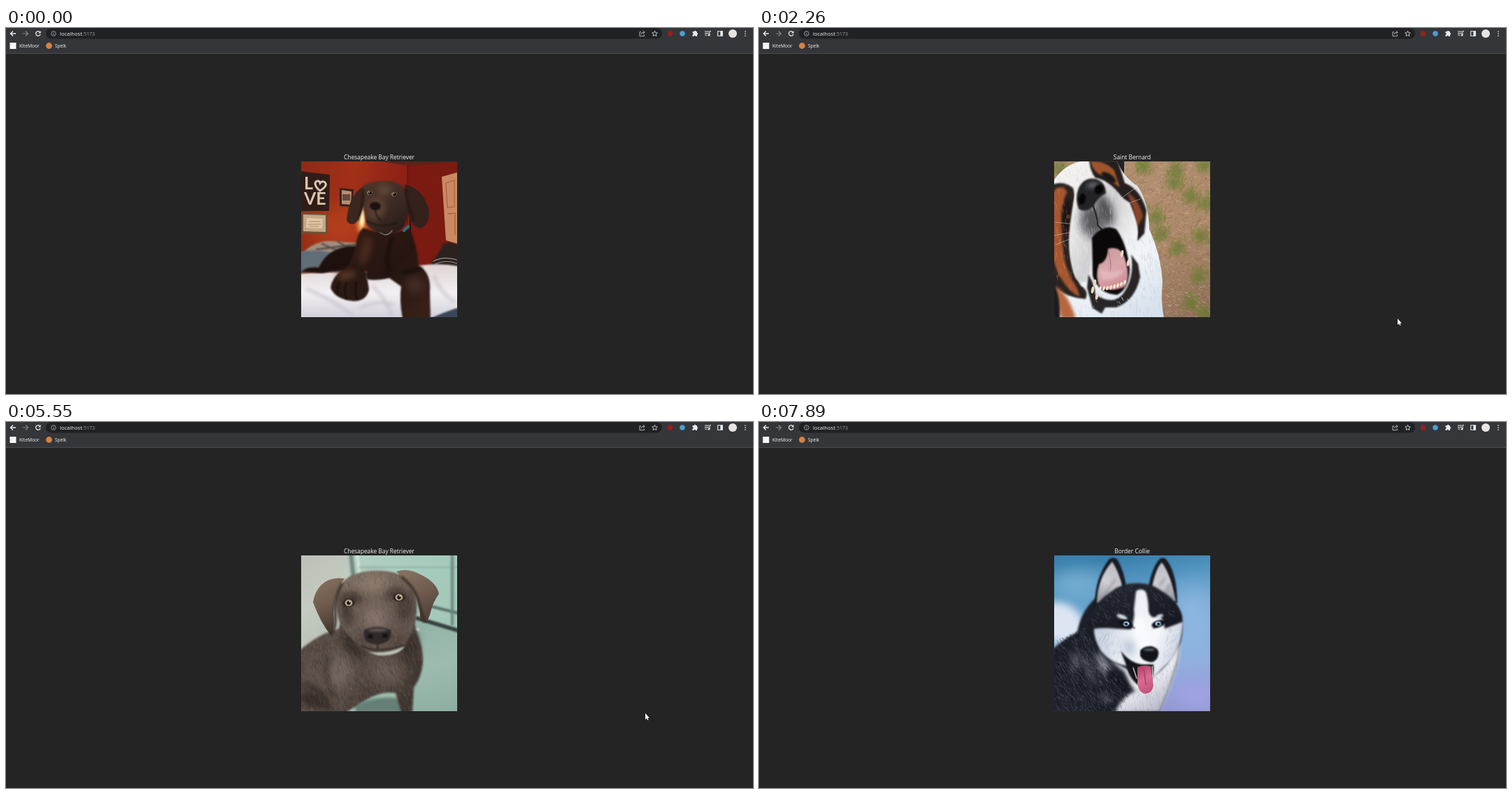
An HTML page with a canvas that plays this animation: 1068x524 px, repeating every 8.22 s.

```html
<!DOCTYPE html>
<html lang="en">
<head>
<meta charset="utf-8">
<title>Dog viewer</title>
<style>
html, body { margin: 0; width: 100%; height: 100%; overflow: hidden; background: #242424; }
canvas { display: block; width: 1068px; height: 524px; }
</style>
</head>
<body>
<canvas id="stage" width="1068" height="524"></canvas>
<script>
const W = 1068, H = 524, LOOP = 8220;
const BOX = { x: 422, y: 191, s: 223 };
const FONT = '"Open Sans", "Noto Sans", sans-serif';
const stage = document.getElementById('stage').getContext('2d');

function random(seed) {
  return () => {
    seed = (seed * 1664525 + 1013904223) % 4294967296;
    return seed / 4294967296;
  };
}

// Renders a picture once; all coordinates are stage coordinates.
function photo(paint) {
  const c = document.createElement('canvas');
  c.width = c.height = BOX.s;
  const g = c.getContext('2d');
  g.translate(-BOX.x, -BOX.y);
  const shape = (color, d, blur = 0.7) => {
    g.filter = blur ? `blur(${blur}px)` : 'none';
    g.fillStyle = color;
    g.fill(new Path2D(d));
    g.filter = 'none';
  };
  const oval = (color, x, y, rx, ry, turn = 0, blur = 0.5) => {
    g.filter = blur ? `blur(${blur}px)` : 'none';
    g.fillStyle = color;
    g.beginPath();
    g.ellipse(x, y, rx, ry, turn, 0, 7);
    g.fill();
    g.filter = 'none';
  };
  const line = (color, d, width, blur = 0.4) => {
    g.filter = blur ? `blur(${blur}px)` : 'none';
    g.strokeStyle = color;
    g.lineWidth = width;
    g.lineCap = 'round';
    g.stroke(new Path2D(d));
    g.filter = 'none';
  };
  const fade = (x0, y0, x1, y1, ...colors) => {
    const f = g.createLinearGradient(x0, y0, x1, y1);
    colors.forEach((k, i) => f.addColorStop(i / (colors.length - 1), k));
    return f;
  };
  // Short strokes inside a shape, for hair and ground texture.
  const fur = (color, d, n, dx, dy, seed) => {
    const r = random(seed);
    g.save();
    g.clip(new Path2D(d));
    g.strokeStyle = color;
    g.lineWidth = 0.7;
    g.beginPath();
    for (let i = 0; i < n; i++) {
      const x = BOX.x + r() * BOX.s, y = BOX.y + r() * BOX.s;
      g.moveTo(x, y);
      g.lineTo(x + dx * (0.4 + r()), y + dy * (0.4 + r()));
    }
    g.stroke();
    g.restore();
  };
  paint({ g, shape, oval, line, fade, fur });
  return c;
}

const ALL = 'M422 191H645V414H422Z';

const bedroom = photo(({ g, shape, oval, line, fade }) => {
  shape(fade(422, 200, 645, 240, '#8e2a16', '#a23018', '#8c2014', '#741810'), ALL, 0);
  oval('rgba(196,76,34,.5)', 480, 285, 52, 30, 0, 14);
  shape('#5a2319', 'M515 188H648V193L574 197Z');
  shape('#7a1a11', 'M574 197L645 192V345H578Z');
  line('#4f120d', 'M574 197V300', 1);
  shape('#c98a63', 'M623 213L648 206V310L629 304Z');
  line('#a8643f', 'M629 222L641 218V256L631 257ZM632 266L642 265V296', 1.3);
  shape('#301d19', 'M420 205L463 210L462 262L420 262Z');
  g.fillStyle = '#ddc6ac';
  g.font = 'bold 25px Lato, sans-serif';
  g.fillText('L', 426, 231);
  g.fillText('VE', 426, 253);
  line('#ddc6ac', 'M449 233C441 227 440 219 446 219Q448 219 449 222Q452 218 456 221C460 225 454 230 449 233Z', 3);
  shape('#37211c', 'M477 229L497 231L495 256L477 255Z');
  shape('#b78e70', 'M480 232L494 234L493 253L480 252Z');
  shape('#66483e', 'M481 238H492V247H481Z');
  shape('#6c5037', 'M423 264L460 266L459 295L423 294Z');
  shape('#c3a787', 'M425 267L457 268L457 292L425 291Z');
  shape('#dfc7a4', 'M430 272L453 273L452 287L429 286Z');
  line('#9b7a5b', 'M434 277H449M432 281H450M435 284H447', 0.8);
  oval('#ffc668', 508, 274, 5, 19, 0, 3);
  oval('#fff0c2', 509, 272, 3, 12, 0, 1.5);
  line('#2d1512', 'M578 262V330', 2);
  shape('#a58d7b', 'M424 322Q445 301 474 306L510 308V332H424Z', 1);
  line('#4c4a4b', 'M444 317L500 310M452 309L485 324M475 306L500 321', 2.4, 1);
  shape('#616d77', 'M420 320Q455 315 476 326L482 350H420Z', 1);
  shape('#2b2220', 'M609 334Q620 322 625 309L632 307L648 310V344H609Z', 1);
  line('#998e86', 'M611 334Q626 326 645 332M614 338Q628 331 645 337', 1.2, 0.6);
  shape(fade(422, 345, 422, 414, '#e1d8d8', '#f3f0f3', '#d3d1db'), 'M420 352Q460 348 500 352L590 340Q620 336 648 341V416H420Z', 1);
  line('#c2bfca', 'M430 374Q470 390 495 411M525 370Q545 390 552 413M612 355Q622 380 641 392M507 400Q530 389 554 396', 3, 2.5);
  shape('#3a4658', 'M606 416Q628 406 648 400V416Z', 1);
  shape('#1e100c', 'M422 349Q431 341 447 343Q462 311 501 312L514 353Q480 344 452 351Z', 1);
  const body = 'M511 286Q543 300 577 287Q588 312 590 340Q608 350 606 378L607 416H567Q562 390 565 370L548 358Q530 362 517 360Q512 354 516 348Q500 343 482 348Q494 338 501 306Q504 291 511 286Z';
  shape(fade(495, 300, 600, 400, '#311b14', '#251510', '#372018'), body, 0.8);
  oval('#4b2c20', 514, 318, 7, 21, 0.25, 5);
  oval('#422c25', 585, 368, 14, 12, 0.4, 6);
  line('#120b09', 'M567 350Q582 350 593 343M553 300Q541 325 548 348', 3, 2);
  shape('#2b1913', 'M480 347Q500 339 515 350L519 374Q516 391 497 391Q471 389 464 372Q466 357 480 347Z', 0.8);
  line('#110b09', 'M477 364Q471 374 475 381M487 364Q482 376 487 388M501 363Q498 376 502 388', 1.8, 0.8);
  oval('#583727', 487, 354, 13, 6, -0.2, 4);
  shape('#3b2720', 'M514 225Q490 237 487 275Q490 283 499 280Q511 265 514 235Z');
  shape('#34211c', 'M570 224Q595 229 604 258Q608 279 593 287Q580 285 574 263Z');
  shape(fade(515, 220, 570, 290, '#4c352b', '#3f2c24', '#281b17'), 'M509 228Q519 218 547 219Q567 220 574 239Q579 262 570 283Q558 297 541 296Q520 291 515 279Q510 253 509 228Z', 0.8);
  line('#22150f', 'M511 232Q511 256 503 276M571 230Q574 256 583 276', 2.5, 1.5);
  oval('#624839', 541, 232, 10, 8, 0, 5);
  oval('#5b4134', 529, 258, 13, 17, 0.2, 4);
  oval('#1b1210', 528, 255, 8, 6, 0.1, 0.8);
  line('#1e1412', 'M528 261Q529 272 536 275M516 277Q538 287 558 279', 1.8, 0.8);
  line('#747370', 'M535 293Q545 300 552 290', 1.5);
  line('#247383', 'M569 290L575 284', 4);
  for (const [x, y] of [[520, 236], [555, 238]]) {
    oval('#a08a71', x, y, 3.6, 3);
    oval('#17100e', x + 0.5, y, 2.6, 2.6, 0, 0.2);
    oval('#f2e9d9', x - 0.5, y - 1, 0.7, 0.7, 0, 0);
  }
});

const bernard = photo(({ shape, oval, line, fade, fur }) => {
  shape(fade(520, 191, 645, 414, '#b08f70', '#ad896b', '#8e7059'), ALL, 0);
  fur('rgba(218,190,157,.5)', ALL, 1400, 4, 2, 4);
  fur('rgba(96,69,48,.4)', ALL, 1100, -3, 3, 9);
  const r = random(22);
  const grass = [[596, 203], [637, 197], [617, 241], [638, 252], [594, 222], [632, 298], [600, 315], [629, 357], [617, 393], [568, 270], [575, 295], [638, 410], [550, 198], [429, 201]];
  for (const [x, y] of grass) {
    oval('rgba(91,117,42,.6)', x, y, 10, 10, 0, 4);
    for (let i = 0; i < 28; i++) {
      const px = x + (r() - 0.5) * 27, py = y + (r() - 0.5) * 27;
      line('rgba(104,137,42,.6)', `M${px} ${py}l${r() * 6 - 2} ${-3 - r() * 5}`, 1, 0);
    }
  }
  shape('#202229', 'M513 190H522V222H512Z');
  const coat = 'M420 220Q439 192 466 190L512 190Q522 215 541 226Q557 249 558 288Q575 326 577 363Q574 389 579 416H420Z';
  shape(fade(440, 200, 570, 400, '#f5f3f1', '#e7e6e7', '#f1f4f8', '#d6e2ed'), coat);
  fur('rgba(156,158,167,.22)', coat, 1200, 1, 6, 7);
  shape('#25201f', 'M472 190H513L523 222Q545 230 554 261L551 294L541 305Q543 278 530 250Q505 235 487 222Q474 210 472 190Z', 1);
  shape('#9e552c', 'M474 191Q496 190 508 204L516 228Q503 220 491 211Q479 208 474 191Z', 1.3);
  shape('#8a4526', 'M526 235Q544 246 549 270L540 286Q537 258 526 235Z', 1.5);
  oval('#191617', 500, 214, 12, 5, 0.6, 1.5);
  shape('#292221', 'M420 224Q436 218 449 229Q455 248 445 286Q438 331 460 369Q472 376 467 388Q440 386 420 370Z', 1);
  shape('#a65730', 'M420 235Q431 221 440 234Q432 253 434 282Q430 326 447 360Q457 373 458 385Q438 374 426 347L420 330Z', 1.5);
  oval('#1e1716', 440, 269, 7, 24, 0.1, 2);
  oval('#5b3528', 442, 270, 2.5, 3, 0, 0.5);
  fur('rgba(219,140,93,.45)', 'M420 220H440V310L455 382L438 386L420 345Z', 700, 1, 7, 12);
  shape('#b7653d', 'M422 369Q440 376 453 416H432Z', 2);
  shape('#211c1c', 'M420 362Q432 384 430 416H420Z', 1);
  const muzzle = 'M455 226Q449 247 445 280Q442 332 452 357Q461 370 472 359L477 304Q492 284 511 287Q525 305 540 302Q546 278 525 251Q505 220 484 215Q463 213 455 226Z';
  shape(fade(447, 260, 540, 300, '#f2f2f2', '#cfced0', '#f5f5f5'), muzzle, 0.8);
  oval('#57575c', 477, 276, 18, 25, -0.15, 7);
  oval('#4b4b50', 495, 260, 10, 24, -0.35, 6);
  fur('rgba(255,255,255,.3)', muzzle, 900, 1, 6, 19);
  shape('#232326', 'M457 229Q465 213 482 216Q496 221 496 237Q485 242 479 254Q468 266 457 259Q451 244 457 229Z', 0.9);
  oval('#66676d', 477, 225, 9, 4, -0.2, 3);
  oval('#050506', 462, 245, 5, 8, 0.2, 0.8);
  oval('#050506', 486, 231, 6, 7, 0.6, 0.8);
  line('#252327', 'M477 253Q484 270 484 282L493 292', 2);
  shape('#282526', 'M471 353Q481 369 481 382Q510 399 523 377Q537 355 532 324L542 338L545 356Q538 390 511 400L495 400L490 409L477 401L469 372Z', 0.8);
  shape('#0b0809', 'M476 300Q493 279 511 288Q526 309 530 345Q529 374 512 382Q486 381 477 355Z', 0.8);
  shape(fade(490, 310, 520, 375, '#c89a99', '#d8a8ac', '#cf8791'), 'M499 316Q517 311 523 330Q531 353 524 370Q505 379 487 371Q480 355 486 338Q498 335 499 316Z', 0.8);
  line('#b17780', 'M500 320Q505 339 501 353', 1.2);
  shape('#e2b6b8', 'M486 345Q502 351 522 345Q515 362 491 361Z', 2);
  for (let i = 0; i < 8; i++) oval('#f2e5cc', 488 + i * 5, 373 - i * i * 0.18, 1.8, 3.2, 0.3, 0.3);
  for (const [x, y] of [[480, 365], [477, 375], [519, 323], [528, 336], [483, 384]]) oval('#eadac0', x, y, 2, 5, 0.2, 0.5);
  fur('rgba(226,226,227,.8)', 'M478 388Q510 400 534 370L536 386Q514 405 478 400Z', 850, 2, 3, 30);
  line('rgba(236,228,216,.8)', 'M448 292L423 297M447 301L425 310M516 245L540 228M520 254L545 245M451 281L424 278', 0.6, 0);
});

const kennel = photo(({ shape, oval, line, fade, fur }) => {
  shape(fade(490, 191, 645, 330, '#b4cfc2', '#a5cbbc', '#a3c6b8'), ALL, 0);
  shape(fade(422, 191, 495, 310, '#bcbfb5', '#c5cbc1', '#b5beb3'), 'M420 188H490V345H420Z', 2);
  line('#71877f', 'M493 188L499 244', 6, 1.4);
  line('#dfebe0', 'M502 188L506 225', 3, 1.5);
  line('#8bafa2', 'M505 208H650', 1.5, 1.2);
  shape(fade(590, 285, 630, 414, '#93b4a7', '#9dbcaf', '#8eaea2'), 'M570 276L648 300V416H560Z', 2);
  line('#58706a', 'M600 262L648 274', 4, 1.3);
  line('#36413f', 'M588 281L648 299', 6, 1.2);
  line('#6d867d', 'M638 190V290', 4, 1.5);
  oval('#e1ebe3', 588, 297, 3, 2, 0, 1);
  shape('#667f76', 'M498 407Q522 391 563 395L570 416H500Z', 2);
  const body = 'M420 327Q447 303 476 296L482 270H578L587 300Q597 325 596 345Q594 366 583 380L581 416H565L557 388Q536 384 511 400L486 416H420Z';
  shape(fade(440, 310, 575, 400, '#574b44', '#61554d', '#4c413b', '#3f3631'), body, 1.5);
  oval('#766860', 478, 358, 15, 24, 0.3, 9);
  oval('#6b5d54', 545, 358, 24, 20, 0.3, 10);
  oval('#362d29', 497, 318, 14, 24, -0.5, 7);
  oval('#3c322d', 578, 320, 10, 22, 0.1, 6);
  oval('#352d29', 440, 398, 24, 13, 0.3, 7);
  line('#302824', 'M422 376Q452 376 463 414M460 335Q452 369 470 394', 4, 3.5);
  fur('rgba(150,134,122,.18)', body, 2200, 2, 5, 33);
  fur('rgba(30,24,22,.22)', body, 2200, 2, 5, 35);
  const head = 'M476 236Q488 217 516 214Q548 210 570 221Q586 234 587 264Q588 290 576 309Q567 328 545 333Q519 335 505 320Q486 305 477 286Q468 260 476 236Z';
  shape(fade(500, 213, 545, 330, '#7e6e62', '#6b5d54', '#5b4f48'), head, 1.2);
  oval('#493d37', 486, 268, 9, 25, -0.2, 5);
  oval('#4b3f38', 571, 264, 12, 22, 0.15, 5);
  oval('#443832', 497, 252, 13, 7, 0.3, 4);
  oval('#443832', 555, 246, 13, 7, -0.3, 4);
  oval('#8d7c6e', 525, 230, 20, 12, 0, 7);
  oval('#83726a', 528, 281, 16, 17, 0, 7);
  oval('#53463f', 508, 315, 11, 8, 0.5, 5);
  oval('#53463f', 560, 314, 10, 9, -0.4, 5);
  fur('rgba(176,158,144,.18)', head, 1600, 1, 4, 71);
  fur('rgba(35,28,24,.18)', head, 1600, 1, 4, 73);
  line('#55463d', 'M486 248Q494 242 503 247M548 241Q558 236 569 241', 2.2, 1.8);
  shape(fade(440, 230, 474, 296, '#84705f', '#6d5a4c', '#43362f'), 'M484 224Q462 221 450 234Q441 244 439 258Q449 286 464 305Q471 294 468 273Q470 242 484 224Z');
  line('#352a25', 'M480 232Q468 254 471 279Q472 294 465 304', 3.5, 1.8);
  shape(fade(575, 215, 610, 284, '#84705f', '#6d594c', '#4a3b33'), 'M558 214Q575 208 594 219Q616 230 619 246Q610 258 606 276L601 288L592 280Q593 243 558 214Z');
  line('#382c27', 'M566 222Q587 239 591 262L598 285', 3.5, 1.8);
  shape('#2f2929', 'M512 298Q530 289 550 298Q553 312 541 316L531 319L518 316Q509 310 512 298Z', 1);
  oval('#605656', 531, 298, 13, 2.5, 0, 1.8);
  oval('#120f10', 521, 307, 4, 3, 0, 0.9);
  oval('#120f10', 542, 306, 4, 3, 0, 0.9);
  line('#352a26', 'M531 318V324M509 321Q531 332 567 320', 2, 1.2);
  shape('#b9c1b7', 'M517 329Q544 333 570 321Q561 336 531 334Z', 0.8);
  for (const [x, y] of [[490, 259], [562, 251]]) {
    oval('#28201d', x, y, 8.5, 5.8, -0.1, 1);
    oval('#b8a17e', x, y, 5.5, 4.7, 0, 0.5);
    oval('#171313', x, y, 2.7, 2.8, 0, 0.3);
    oval('#f0eadf', x + 1.4, y - 1.8, 1, 1, 0, 0.2);
  }
});

const husky = photo(({ shape, oval, line, fade, fur }) => {
  shape(fade(520, 191, 560, 414, '#377fad', '#609fc9', '#83add8', '#94aedf', '#9199d4'), ALL, 0);
  oval('#80b5d6', 455, 232, 42, 17, 0, 15);
  oval('#8cb6e0', 620, 285, 30, 50, 0, 16);
  oval('#a3a3e4', 627, 391, 35, 17, 0, 12);
  oval('#dde5f3', 430, 287, 35, 28, 0.4, 6);
  const body = 'M420 325Q440 307 455 301Q461 267 486 248L594 258Q607 276 604 306Q600 328 598 345L584 386L572 416H420Z';
  shape(fade(445, 310, 565, 400, '#1c1e28', '#21242e', '#12141c'), body, 1.8);
  shape(fade(520, 340, 570, 414, '#d9dce6', '#ececf1', '#b7b8c8'), 'M481 298Q491 336 522 357L532 378L538 386Q521 390 509 416H573L586 384L599 342L603 315L560 360Z', 2.5);
  oval('#8b8f9b', 492, 347, 7, 18, -0.5, 5);
  oval('#6b6f7b', 470, 352, 3, 24, -0.4, 5);
  oval('#646873', 452, 343, 4, 17, 0.2, 5);
  oval('#555965', 496, 396, 9, 5, 0.6, 5);
  oval('#151720', 511, 371, 8, 19, -0.7, 3);
  fur('rgba(160,167,184,.25)', 'M420 315L475 290L490 340L530 380L510 416H420Z', 2600, 4, 6, 40);
  fur('rgba(13,15,22,.5)', 'M420 315L475 290L490 340L535 380L515 416H420Z', 2600, 4, 6, 43);
  fur('rgba(112,120,148,.25)', 'M535 362L600 340L584 390L572 414H512Z', 1800, 1, 6, 45);
  shape('#191b24', 'M480 262Q480 224 500 197Q507 191 513 198Q522 213 526 241L511 263Z', 0.8);
  shape(fade(485, 255, 518, 210, '#9799a3', '#d0cfd3', '#bcbac0'), 'M483 259Q484 223 505 200Q515 215 520 238L502 258Z', 1.3);
  shape('#191b24', 'M556 239Q562 207 573 196Q579 192 584 199Q598 220 598 259L584 260Z', 0.8);
  shape(fade(565, 210, 590, 255, '#c1c0c6', '#cecdd2', '#9698a2'), 'M562 236Q567 210 576 201Q589 219 596 257L583 256Z', 1.3);
  line('#7d808b', 'M491 252L509 226M499 253L512 236M573 234L580 224M582 246L587 233', 2, 2);
  const head = 'M474 274Q488 252 502 244Q517 231 536 231Q559 229 576 242Q599 256 605 278Q607 306 597 325Q584 350 568 361Q554 374 537 361Q521 349 500 342Q479 319 472 300Q467 286 474 274Z';
  shape(fade(530, 240, 560, 360, '#21242d', '#151821', '#242831'), head, 1.5);
  shape(fade(495, 300, 597, 330, '#cdd5e3', '#eef1f7', '#f6f8fb', '#cdd4e2'), 'M539 242Q547 237 553 243Q557 255 557 271Q560 282 567 279Q578 276 580 296L606 286Q605 318 590 340Q577 352 563 367L534 360L519 331L528 349Q505 347 489 328Q478 309 479 296Q495 294 511 296L532 297Q538 286 536 268Z', 1.6);
  oval('#dbe1ea', 519, 279, 8, 3, 0.35, 1.8);
  oval('#d7dde8', 573, 278, 5, 2.5, -0.3, 1.6);
  oval('#f8fafc', 547, 305, 11, 28, -0.15, 3);
  fur('rgba(121,137,165,.25)', 'M481 296L512 298L524 348L490 330ZM586 295H606L593 334L574 348Z', 2400, -2, 5, 52);
  fur('rgba(150,157,175,.25)', 'M474 274Q500 240 535 233L531 281L478 294ZM558 239L600 260V283L574 275Z', 1800, -3, -4, 63);
  for (const [x, y, tilt] of [[525, 289, 0.35], [571, 289, -0.3]]) {
    oval('#0f1219', x, y, 10, 5, tilt, 1);
    oval('#c2dced', x, y, 4.6, 3.6, 0, 0.5);
    oval('#7fb4d5', x, y, 2.9, 2.8, 0, 0.3);
    oval('#10151d', x, y, 1.5, 1.5, 0, 0.2);
  }
  line('#141720', 'M513 285L537 295M581 285L564 295', 1.6, 0.8);
  oval('#b8c5d5', 529, 323, 8, 12, -0.3, 6);
  shape('#12141a', 'M545 327Q551 320 561 321Q573 324 571 333Q570 342 561 344Q549 343 545 335Z', 0.8);
  oval('#545b66', 558, 326, 8, 2, 0, 1.3);
  shape('#15151b', 'M517 327Q530 345 548 347L564 347Q566 360 559 377L541 376Q528 365 526 351Z', 0.8);
  line('#c9c4c5', 'M535 352L540 367M562 350L563 366', 1.4, 0.6);
  shape(fade(540, 350, 563, 386, '#b23b66', '#d96b94', '#c14f79'), 'M541 351Q550 347 560 350L564 378Q561 390 551 389Q541 386 541 370Z', 0.7);
  line('#a53965', 'M550 353L553 376', 1.3, 0.5);
});

// Caption and picture from each moment on.
const CB = 'Chesapeake Bay Retriever', SB = 'Saint Bernard', BC = 'Border Collie';
const scenes = [
  [0, CB, bedroom], [1790, BC, null], [1860, BC, husky],
  [2190, SB, null], [2260, SB, bernard],
  [3930, BC, null], [4000, BC, husky], [4070, CB, null], [4140, CB, kennel],
  [5960, BC, null], [6030, BC, husky]
];

// Pointer moves: start, end, number of poses, way points.
const moves = [
  [190, 600, 6, [[1014, 500], [974, 467], [937, 437], [914, 418], [905, 409], [913, 416]]],
  [5550, 6240, 10, [[914, 417], [917, 419], [921, 423], [921, 423], [914, 415], [908, 409]]],
  [7120, 7820, 11, [[909, 410], [918, 417], [945, 435], [983, 461], [1025, 490], [1058, 516]]]
];

function pointer(t) {
  if (t < 190 || t >= 7890) return null;
  const [start, end, n, pts] = moves.filter(m => m[0] <= t).pop();
  const gap = (end - start) / (n - 1);
  const k = Math.min(n - 1, Math.floor((t - start) / gap + 1e-6));
  const u = k / (n - 1) * (pts.length - 1);
  const i = Math.min(pts.length - 2, Math.floor(u));
  return pts[i].map((v, j) => v + (pts[i + 1][j] - v) * (u - i));
}

function fill(color, d) {
  stage.fillStyle = color;
  stage.fill(new Path2D(d));
}
function stroke(color, d, width = 1) {
  stage.strokeStyle = color;
  stage.lineWidth = width;
  stage.stroke(new Path2D(d));
}
function disc(color, x, y, r) {
  stage.fillStyle = color;
  stage.beginPath();
  stage.arc(x, y, r, 0, 7);
  stage.fill();
}
function text(s, x, y, size, color, align = 'left') {
  stage.font = `${size}px ${FONT}`;
  stage.textAlign = align;
  stage.fillStyle = color;
  stage.fillText(s, x, y);
}

function toolbar(loading) {
  const ink = '#e8eaed';
  fill('#35363a', 'M0 0H1068V36H0Z');
  fill('#4b4a4c', 'M0 36H1068V37H0Z');
  fill('#202124', 'M65 0H930Q938 1 938 8Q938 15 930 15.5H65Q57 15 57 8Q57 1 65 0Z');
  stroke(ink, 'M14 8H6.8M10 4.5L6.5 8L10 11.5', 1.3);
  stroke('#85868a', 'M24 8H31.2M28 4.5L31.5 8L28 11.5', 1.2);
  if (loading) stroke(ink, 'M43 5L49 11M49 5L43 11', 1.2);
  else {
    stroke(ink, 'M48.3 5.6A3.3 3.3 0 1 0 49.1 9', 1.3);
    fill(ink, 'M49.7 4V7.5H46.2Z');
  }
  stroke('#b5b7ba', 'M64.7 8a3.3 3.3 0 1 0 6.6 0a3.3 3.3 0 1 0 -6.6 0M68 7.4V10M68 5.7V6.5', 0.8);
  text('localhost', 77, 10.6, 7.6, '#f4f5f7');
  text(':5173', 109, 10.6, 7.1, '#9aa0a6');
  stroke('#c4c7ca', 'M908 5.7H906V11.6H912.4V9.5M908 9Q908.4 6.2 912 6.2M910.8 4.2L913.3 6.3L910.8 8.3', 0.9);
  stroke('#d4d6d9', 'M927.5 4.2L928.6 6.7L931.3 7L929.3 8.8L929.9 11.5L927.5 10.1L925.1 11.5L925.7 8.8L923.7 7L926.4 6.7Z', 0.9);
  disc('#96201e', 949.5, 8, 3.8);
  disc('#4a9fd0', 967, 8, 3.8);
  fill(ink, 'M982 5H984A1.2 1.2 0 0 1 986.4 5H988V7.2A1.2 1.2 0 0 1 988 9.6V12H985.8A1.2 1.2 0 0 0 983.4 12H981.5V9.6A1.2 1.2 0 0 0 981.5 7.2V5Z');
  stroke(ink, 'M999 5H1005M999 7.5H1005M999 10H1002.5M1006 10V4.6H1008', 1);
  disc(ink, 1005, 10.2, 1.4);
  stroke(ink, 'M1017.6 4.7H1024.4V11.3H1017.6Z', 1.1);
  fill(ink, 'M1021.3 4.5H1024.5V11.5H1021.3Z');
  disc('#e6e5e4', 1039, 8, 6);
  for (const y of [5, 8, 11]) disc(ink, 1057, y, 0.85);
  fill('#f6f6f6', 'M5.5 21H14.5V30H5.5Z');
  text('KiteMoor', 19, 28.2, 6.7, '#f4f5f7');
  disc('#d9813f', 61.5, 25.5, 4.4);
  text('Spelk', 70, 28.2, 6.5, '#f4f5f7');
}

function draw(t) {
  stage.fillStyle = '#242424';
  stage.fillRect(0, 0, W, H);
  toolbar(t >= 1330 && t < 1400);
  const [, caption, pic] = scenes.filter(s => s[0] <= t).pop();
  text(caption, 533.5, 187.8, 8.4, '#f4f4f4', 'center');
  if (pic) stage.drawImage(pic, BOX.x, BOX.y);
  const at = pointer(t);
  if (at) {
    stage.save();
    stage.translate(at[0], at[1]);
    const arrow = 'M0 0V9L2 7.2L3.3 10L4.6 9.4L3.4 6.7H6Z';
    stroke('#111', arrow, 0.9);
    fill('#fff', arrow);
    stage.restore();
  }
}

const begin = performance.now();
function tick() {
  draw((performance.now() - begin) % LOOP);
  requestAnimationFrame(tick);
}
tick();
</script>
</body>
</html>
```
